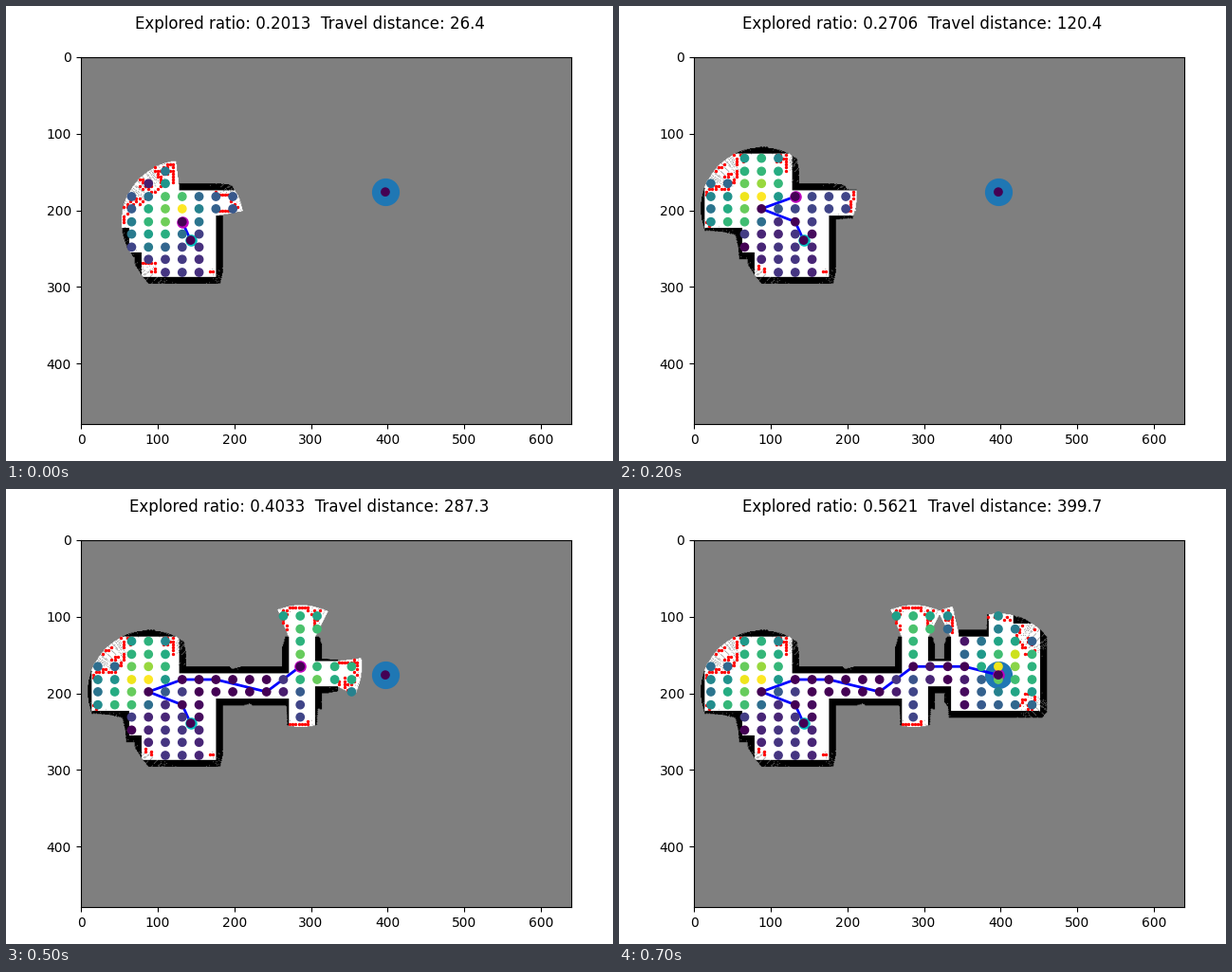
Animation, 640 px wide and 480 px high, one loop 0.8 s. Source, as a matplotlib script:

```python
import numpy as np
import matplotlib.pyplot as plt
from matplotlib.animation import FuncAnimation

W, H = 640, 480
SENSOR = 80        # reach of a range scan
VIEW = 70          # reach when counting frontiers from a node
WALL_DEPTH = 9     # wall cells a ray shows before it stops
CELL = 4           # frontier cell size
WALL, UNKNOWN, FREE = 0, 127, 255

RATIOS = [0.2013, 0.2692, 0.2706, 0.2906, 0.3281, 0.4033, 0.5247, 0.5621]

XS = np.linspace(0, W - 1, 30).round().astype(int)
YS = np.linspace(0, H - 1, 30).round().astype(int)
START, GOAL = (143, 239), (397, 176)
ROUTE = [(6, 13), (4, 12), (6, 11), (8, 11), (11, 12), (13, 10), (16, 10)]
PATH = [START] + [(XS[i], YS[j]) for i, j in ROUTE] + [GOAL]

# Rooms and corridors as x0, x1, y0, y1.
ROOMS = [
    (14, 128, 127, 224),    # west room
    (63, 128, 175, 256),    # step
    (79, 176, 175, 288),    # south room
    (127, 271, 175, 208),   # long corridor
    (271, 305, 126, 400),   # crossing passage
    (230, 345, 20, 127),    # north room
    (304, 336, 159, 192),   # short corridor
    (335, 451, 110, 224),   # east room
    (384, 416, 20, 111),    # north door
]
world = np.full((H, W), WALL)
for x0, x1, y0, y1 in ROOMS:
    world[y0:y1, x0:x1] = FREE
world[20:127, 345:384] = WALL


def line(p, q):
    """Grid cells from p up to, but without, q."""
    (x0, y0), (x1, y1) = p, q
    n = max(abs(x1 - x0), abs(y1 - y0), 1)
    t = np.arange(n) / n
    return (np.rint(y0 + (y1 - y0) * t).astype(int),
            np.rint(x0 + (x1 - x0) * t).astype(int))


def scan(belief, pos):
    for angle in np.radians(np.arange(0, 360, 0.5)):
        end = (round(pos[0] + SENSOR * np.cos(angle)),
               round(pos[1] + SENSOR * np.sin(angle)))
        ys, xs = line(pos, end)
        seen = world[ys, xs]
        walls = np.flatnonzero(seen == WALL)
        stop = len(seen)
        if len(walls):
            hit = walls[0]
            behind = np.flatnonzero(seen[hit:] == FREE)
            depth = min(WALL_DEPTH, behind[0] if len(behind) else WALL_DEPTH)
            stop = hit + depth
        belief[ys[:stop], xs[:stop]] = seen[:stop]


def find_frontiers(belief):
    """Free coarse cells that touch unknown ones."""
    coarse = belief.reshape(H // CELL, CELL, W // CELL, CELL).min(axis=(1, 3))
    unknown = np.pad((coarse == UNKNOWN).astype(int), 1)
    rows, cols = coarse.shape
    around = sum(unknown[dy:dy + rows, dx:dx + cols]
                 for dy in range(3) for dx in range(3) if (dx, dy) != (1, 1))
    ys, xs = np.nonzero((coarse == FREE) & (around > 1) & (around < 8))
    return np.column_stack([xs, ys]) * CELL


def utility(belief, node, frontiers):
    near = frontiers[np.hypot(*(frontiers - node).T) < VIEW]
    return sum((belief[line(node, f)] == FREE).all() for f in near)


def explore():
    belief = np.full((H, W), UNKNOWN)
    scan(belief, START)
    states = []
    for k, pos in enumerate(PATH[1:], 1):
        scan(belief, pos)
        frontiers = find_frontiers(belief)
        nodes = [(x, y) for x in XS for y in YS if belief[y, x] == FREE]
        values = [0 if n in PATH[:k + 1] else utility(belief, n, frontiers)
                  for n in nodes]
        states.append((belief.copy(), frontiers, nodes + [START, GOAL], values + [0, 0]))
    return states


STATES = explore()
LEGS = np.hypot(*np.diff(PATH, axis=0).T)
DISTANCES = np.cumsum(LEGS)

fig = plt.figure(figsize=(W / 100, H / 100), dpi=100)
ax = fig.add_axes([78.7 / W, 38.6 / H, 517.2 / W, 387.85 / H])
title = fig.suptitle("")


def draw(k):
    belief, frontiers, nodes, values = STATES[k]
    ax.clear()
    ax.imshow(belief, cmap="gray", vmin=WALL, vmax=FREE, aspect="auto")
    ax.scatter(*frontiers.T, s=2, c="red", zorder=2)
    ax.scatter(*GOAL, s=400, c="tab:blue", zorder=2.5)
    ax.plot(*zip(*PATH[:k + 2]), "b", lw=2, zorder=3)
    ax.plot(*PATH[k + 1], "mo", ms=8, zorder=4)
    ax.plot(*START, "co", ms=8, zorder=4)
    ax.scatter(*zip(*nodes), c=values, cmap="viridis", zorder=5)
    ax.set(xlim=(-0.5, W - 0.5), ylim=(H - 0.5, -0.5))
    title.set_text(f"Explored ratio: {RATIOS[k]:.4f}  "
                   f"Travel distance: {DISTANCES[k]:.4g}")
    return []


anim = FuncAnimation(fig, draw, frames=len(STATES), interval=100, repeat=True,
                     repeat_delay=0, init_func=lambda: [])
plt.show()
```
